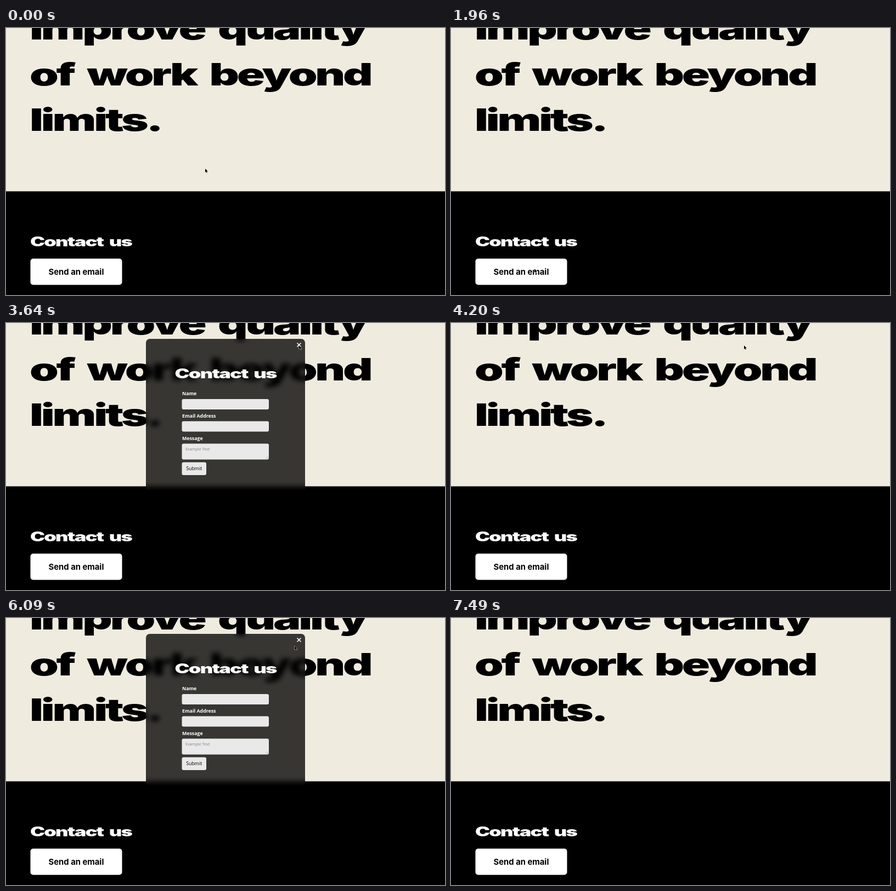
Recreate the animation shown at these times as an HTML page with a canvas. Size 800 by 488 pixels, loop 7560 ms.

```html
<!DOCTYPE html>
<html lang="en">
<head>
<meta charset="utf-8">
<title>Contact form</title>
<style>
  html, body { margin: 0; width: 100%; height: 100%; overflow: hidden; background: #000; }
  canvas { display: block; }
</style>
</head>
<body>
<canvas id="stage" width="800" height="488"></canvas>
<script>
const W = 800, H = 488, LOOP = 7560, STEP = 70;
const CREAM = '#efebde', FIELD = '#e9e9e9';
const WIDE = 1.51; // one expansion factor for the extended display face
const BODY = '"Open Sans", sans-serif';
const ctx = document.getElementById('stage').getContext('2d');

// Times at which the form is open
const OPEN = [[2170, 4060], [5040, 6580]];

// Pointer path: time, x, y
const PATH = [
  [0, 363, 257], [770, 300, 322], [1050, 300, 322], [1400, 211, 392],
  [1820, 152, 440], [2380, 152, 440], [2590, 372, 198], [3000, 534, 41],
  [4200, 534, 41], [4900, 150, 440], [5040, 150, 440], [5180, 163, 430],
  [6090, 526, 51], [6400, 534, 41], [6720, 534, 41], [7420, 352, 85], [LOOP, 352, 85]
];
const HIDE_AT = 7420;

function layer(paint) {
  const c = document.createElement('canvas');
  c.width = W;
  c.height = H;
  paint(c.getContext('2d'));
  return c;
}

function box(g, x, y, w, h, r, fill) {
  g.beginPath();
  g.roundRect(x, y, w, h, r);
  g.fillStyle = fill;
  g.fill();
}

function label(g, text, x, y, font, fill, align = 'left') {
  g.font = font;
  g.fillStyle = fill;
  g.textAlign = align;
  g.fillText(text, x, y);
}

// Extended heavy face: tight letters, open word gaps
function display(g, text, x, y, size, fill, align) {
  g.save();
  g.translate(x, y);
  g.scale(WIDE, 1);
  g.letterSpacing = `${-.05 * size}px`;
  g.wordSpacing = `${.14 * size}px`;
  label(g, text, 0, 0, `900 ${size}px Inter, sans-serif`, fill, align);
  g.restore();
}

const page = layer(g => {
  g.fillStyle = '#000';
  g.fillRect(0, 0, W, H);
  g.fillStyle = CREAM;
  g.fillRect(0, 0, W, 298.5);
  ['improve quality', 'of work beyond', 'limits.'].forEach((line, i) =>
    display(g, line, 43, 21 + i * 83.5, 56, '#000'));
  display(g, 'Contact us', 44, 398.5, 24, '#fff');
  box(g, 44.5, 421.5, 167, 48, 5, '#fff');
  label(g, 'Send an email', 128, 451, '700 14.8px Inter, sans-serif', '#000', 'center');
});

const form = layer(g => {
  g.save();
  g.beginPath();
  g.roundRect(255, 29, 290, 430, 7);
  g.clip();
  g.filter = 'blur(5px)';
  g.drawImage(page, 0, 0);
  g.filter = 'none';
  g.fillStyle = 'rgba(0,0,0,.77)';
  g.fillRect(255, 29, 290, 277);
  g.fillStyle = '#000';
  g.fillRect(255, 306, 290, 160);
  g.restore();

  g.strokeStyle = '#fff';
  g.lineWidth = 1.6;
  g.beginPath();
  g.moveTo(530.5, 36.5);
  g.lineTo(537.5, 43.5);
  g.moveTo(537.5, 36.5);
  g.lineTo(530.5, 43.5);
  g.stroke();

  display(g, 'Contact us', 400, 100.5, 24, '#fff', 'center');
  [['Name', 132, 139, 19], ['Email Address', 173, 179.5, 19], ['Message', 213.5, 220.5, 29]]
    .forEach(([name, base, top, h]) => {
      label(g, name, 321, base, `700 8.8px ${BODY}`, '#fff');
      box(g, 320.5, top, 158.5, h, 3, FIELD);
    });
  label(g, 'Example Text', 327, 232.5, `7.2px ${BODY}`, '#858585');

  // resize grip
  g.strokeStyle = '#999';
  g.lineWidth = .6;
  g.beginPath();
  g.moveTo(473.5, 248);
  g.lineTo(478, 243.5);
  g.moveTo(476, 248);
  g.lineTo(478, 246);
  g.stroke();

  box(g, 320.5, 254.5, 44.5, 23.5, 3, FIELD);
  label(g, 'Submit', 342.8, 269.3, `8.8px ${BODY}`, '#000', 'center');
});

// Slope at a path point; zero where the pointer rests
function slope(i, k) {
  const a = PATH[i - 1], p = PATH[i], b = PATH[i + 1];
  if (!a || !b) return 0;
  const before = (p[k] - a[k]) / (p[0] - a[0]);
  const after = (b[k] - p[k]) / (b[0] - p[0]);
  if (before * after <= 0) return 0;
  return 2 * before * after / (before + after);
}

function pointerAt(t) {
  let i = 0;
  while (i < PATH.length - 2 && t >= PATH[i + 1][0]) i++;
  const a = PATH[i], b = PATH[i + 1], d = b[0] - a[0], u = (t - a[0]) / d;
  return [1, 2].map(k => {
    const m = slope(i, k) * d, n = slope(i + 1, k) * d;
    return a[k] * (1 + 2 * u) * (1 - u) ** 2 + m * u * (1 - u) ** 2
         + b[k] * u * u * (3 - 2 * u) + n * u * u * (u - 1);
  });
}

function outline(points) {
  ctx.beginPath();
  points.forEach(([x, y]) => ctx.lineTo(x, y));
  ctx.closePath();
}

function arrow() {
  outline([[0, 0], [0, 7], [1.6, 5.6], [2.7, 8], [3.8, 7.5], [2.8, 5.2], [4.9, 5]]);
  ctx.strokeStyle = 'rgba(255,255,255,.85)';
  ctx.lineWidth = 1;
  ctx.stroke();
  ctx.fillStyle = '#000';
  ctx.fill();
}

function beam() {
  ctx.beginPath();
  ctx.moveTo(-2, -4.5);
  ctx.lineTo(2, -4.5);
  ctx.moveTo(0, -4.5);
  ctx.lineTo(0, 4.5);
  ctx.moveTo(-2, 4.5);
  ctx.lineTo(2, 4.5);
  ctx.strokeStyle = 'rgba(255,255,255,.8)';
  ctx.lineWidth = 2;
  ctx.stroke();
  ctx.strokeStyle = '#222';
  ctx.lineWidth = .9;
  ctx.stroke();
}

function draw(t) {
  ctx.drawImage(page, 0, 0);
  if (OPEN.some(([from, to]) => t >= from && t < to)) ctx.drawImage(form, 0, 0);
  if (t >= HIDE_AT) return;
  const [x, y] = pointerAt(t);
  ctx.save();
  ctx.translate(x, y);
  if (x > 45 && x < 235 && y > 375 && y < 405) beam();
  else arrow();
  ctx.restore();
}

const start = performance.now();
function tick() {
  const t = (performance.now() - start) % LOOP;
  draw(Math.floor(t / STEP) * STEP);
  requestAnimationFrame(tick);
}
tick();
</script>
</body>
</html>
```
